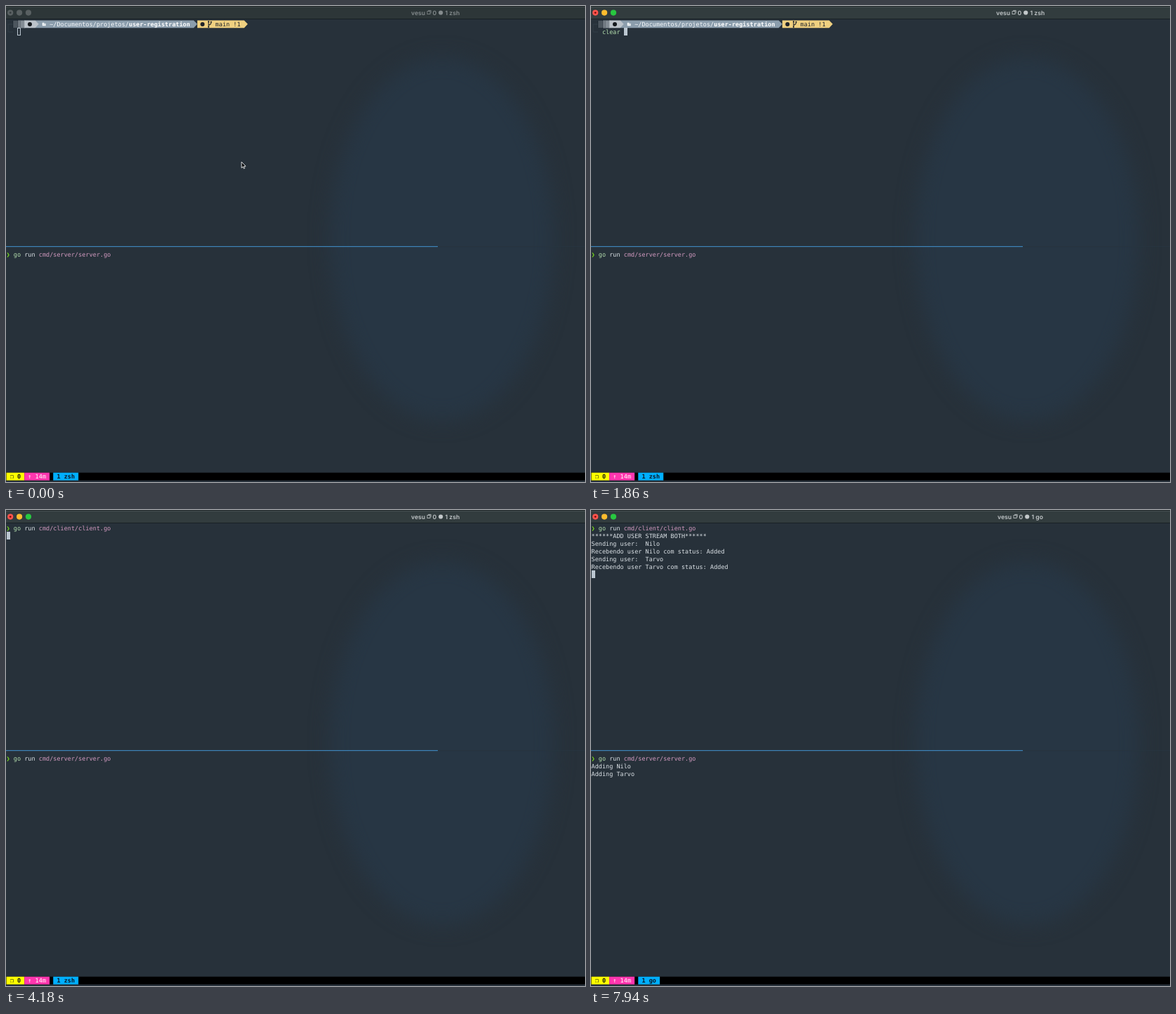
Recreate the animation shown at these times as an HTML page with a canvas. Size 826 by 678 pixels, loop 8 s.

```html
<!DOCTYPE html>
<html lang="pt">
<head>
<meta charset="utf-8">
<title>Terminal</title>
<style>
  html, body { margin: 0; width: 100%; height: 100%; overflow: hidden; background: #27313a; }
  canvas { display: block; width: 826px; height: 678px; }
</style>
</head>
<body>
<canvas id="stage" width="826" height="678"></canvas>
<script>
const LOOP = 8000;
const ctx = document.getElementById('stage').getContext('2d');
ctx.textRendering = 'geometricPrecision';

// Terminal grid
const CELL = 5.14, ROW = 10.92, LEFT = 0.5, TOP = 20.4;
const MONO = '8.54px "DejaVu Sans Mono", monospace';
const UI = '600 8.6px Inter, sans-serif';
const colX = c => LEFT + c * CELL;
const rowY = r => TOP + r * ROW;

const C = {
  bg: '#27313a', text: '#dbe1e6', go: '#b4dfae', path: '#d49bc1', mark: '#7be01c',
  light: '#bcc3ca', blue: '#8b9dac', sand: '#efd080', cursor: '#bcc7d1'
};

// Time points in ms
const FOCUS = 380, FIRST_KEY = 1140, RUN = 4180, REPLY = 5380, REPLY2 = 7380;
const RUN_CLIENT = 'go run cmd/client/client.go';
const HISTORY = [
  [FIRST_KEY, 'clear'], [1400, RUN_CLIENT], [1860, 'clear'],
  [2180, RUN_CLIENT], [3220, 'clear'], [3500, RUN_CLIENT]
];
const USERS = ['Nilo', 'Tarvo'];

function rect(x, y, w, h, color) {
  ctx.fillStyle = color;
  ctx.fillRect(x, y, w, h);
}

function disc(x, y, r, color) {
  ctx.fillStyle = color;
  ctx.beginPath();
  ctx.arc(x, y, r, 0, 7);
  ctx.fill();
}

function poly(points, fill, stroke, width = 1) {
  ctx.beginPath();
  points.forEach(([x, y]) => ctx.lineTo(x, y));
  ctx.closePath();
  if (fill) { ctx.fillStyle = fill; ctx.fill(); }
  if (stroke) { ctx.strokeStyle = stroke; ctx.lineWidth = width; ctx.stroke(); }
}

function print(str, col, row, color = C.text, bold = false) {
  ctx.font = (bold ? 'bold ' : '') + MONO;
  ctx.fillStyle = color;
  ctx.fillText(str, colX(col), rowY(row) + 8.7);
}

function command(str, col, row) {
  const [name, sub, path] = str.split(' ');
  print(name, col, row, C.go);
  if (sub) print(sub, col + 3, row);
  if (path) print(path, col + 7, row, C.path);
}

function entered(str, row) {
  print('❯', 0, row, C.mark, true);
  command(str, 2, row);
}

function cursor(col, row, solid = true) {
  const x = Math.round(colX(col)), y = Math.round(rowY(row));
  if (solid) return rect(x, y, 5, 11, C.cursor);
  ctx.strokeStyle = C.cursor;
  ctx.lineWidth = 1;
  ctx.strokeRect(x + 0.5, y + 0.5, 4, 10);
}

function backdrop() {
  rect(0, 0, 826, 678, C.bg);
  ctx.save();
  ctx.filter = 'blur(14px)';
  ctx.fillStyle = '#273644';
  ctx.beginPath();
  ctx.ellipse(622, 332, 160, 258, 0, 0, 7);
  ctx.fill();
  ctx.restore();
}

function titleBar(active, job) {
  rect(0, 0, 826, 19, active ? '#323c3e' : '#2d3638');
  rect(0, 0, 826, 1, '#1d2426');
  rect(0, 1, 826, 1, active ? '#465052' : '#3c4547');
  rect(0, 18, 826, 1, '#182025');
  const lights = active ? ['#ff544d', '#fdbc2e', '#28c840'] : Array(3).fill('#596062');
  lights.forEach((color, i) => disc(6.2 + i * 12.9, 9.6, 4.1, color));
  disc(6.2, 9.6, 1.4, active ? '#7c0b08' : '#343b3d');

  const color = active ? '#c3c8ca' : '#858c8e';
  const x = job === 'zsh' ? 578 : 580;
  const label = (str, dx) => { ctx.fillStyle = color; ctx.fillText(str, x + dx, 12.5); };
  ctx.font = UI;
  label('vesu', 0);
  label('0', 30.5);
  label('1 ' + job, 48.5);
  ctx.strokeStyle = color;
  ctx.lineWidth = 0.8;
  ctx.strokeRect(x + 23, 7.6, 4, 4);
  ctx.beginPath();
  ctx.moveTo(x + 24.2, 6.4);
  ctx.lineTo(x + 28.2, 6.4);
  ctx.lineTo(x + 28.2, 10.4);
  ctx.stroke();
  disc(x + 42.2, 9.5, 3.1, color);
}

function segment(from, to, color) {
  const y = rowY(0), x1 = colX(to);
  poly([[colX(from), y], [x1, y], [x1 + CELL, y + ROW / 2], [x1, y + ROW], [colX(from), y + ROW]], color);
}

// Dithered fade, thickening over three cells
function fade() {
  const x0 = Math.round(colX(2));
  for (let x = 0; x < 16; x++) {
    for (let y = 0; y < 11; y++) {
      const odd = (x + y) % 2, cell = Math.floor(x / 5.2);
      const on = [odd && y % 2, odd, odd || y % 2][cell];
      if (on) rect(x0 + x, 20.5 + y, 1, 1, C.light);
    }
  }
}

function folderIcon(x, y) {
  rect(x, y, 2.6, 1.4, '#f4f7f9');
  rect(x, y + 1, 5, 3.4, '#f4f7f9');
  rect(x + 1.3, y + 1.9, 3.7, 0.5, C.blue);
}

function branchIcon(x, y) {
  ctx.strokeStyle = '#20242a';
  ctx.lineWidth = 1.1;
  ctx.beginPath();
  ctx.moveTo(x, y);
  ctx.lineTo(x, y + 8);
  ctx.moveTo(x, y + 5.5);
  ctx.quadraticCurveTo(x + 3.6, y + 4.8, x + 3.6, y + 1.5);
  ctx.stroke();
  [[0, 0.5], [0, 8], [3.6, 1]].forEach(([dx, dy]) => disc(x + dx, y + dy, 1.1, '#20242a'));
}

function prompt() {
  ctx.strokeStyle = '#38424b';
  ctx.lineWidth = 0.7;
  ctx.beginPath();
  ctx.moveTo(10, 26);
  ctx.lineTo(3.2, 26);
  ctx.lineTo(3.2, 37);
  ctx.lineTo(10, 37);
  ctx.stroke();

  segment(53, 66, C.sand);
  segment(8, 52, C.blue);
  segment(5, 8, C.light);
  fade();
  disc(34, 26, 3, '#15191d');
  folderIcon(51.8, 23.8);
  print('~/Documentos/projetos/', 12, 0, '#f6f8fa');
  print('user-registration', 34, 0, '#ffffff', true);
  disc(280.3, 26, 3, '#20242a');
  branchIcon(289, 21.8);
  print('main !1', 58, 0, '#20242a');
}

function statusBar(job) {
  const y = 664.7, h = 11;
  const block = (col, cells, color) => rect(colX(col), y, cells * CELL, h, color);
  rect(0, y, 826, h, '#000');
  block(0, 5, '#ffff00');
  block(5, 7, '#ff36ae');
  block(13, job.length + 4, '#00afff');
  print('❐', 1, 59, '#111');
  print('0', 3, 59, '#111', true);
  print('↑ 14m', 6, 59, '#fff');
  print('1 ' + job, 14, 59, '#0b1620', true);
}

function divider() {
  rect(0, 342, 616, 1.2, '#3d83b8');
  rect(616, 342, 210, 1.2, '#27343f');
}

function arrow(x, y) {
  const tip = [[0, 0], [0, 8.6], [2, 6.8], [3.3, 9.7], [4.6, 9.1], [3.4, 6.3], [6, 6.2]];
  poly(tip.map(([px, py]) => [x + px, y + py]), '#0a0c0e', '#f2f4f5', 0.9);
}

function beam(x, y) {
  for (const [color, width] of [['#11171c', 2.4], ['#e9edf0', 1]]) {
    ctx.strokeStyle = color;
    ctx.lineWidth = width;
    ctx.beginPath();
    for (const s of [-1, 1]) {
      ctx.moveTo(x - 2.5, y + s * 5);
      ctx.lineTo(x, y + s * 4);
      ctx.lineTo(x + 2.5, y + s * 5);
    }
    ctx.moveTo(x, y - 4);
    ctx.lineTo(x, y + 4);
    ctx.moveTo(x - 1.5, y);
    ctx.lineTo(x + 1.5, y);
    ctx.stroke();
  }
}

function pointer(t) {
  if (t >= FIRST_KEY) return;
  if (t < FOCUS) arrow(336 - t / FOCUS, 222);
  else beam(335.2, 223);
}

function client(t) {
  if (t < RUN) {
    prompt();
    const entry = HISTORY.filter(([at]) => t >= at).pop();
    if (entry) command(entry[1], 3, 0 + 1);
    cursor(entry ? entry[1].length + 4 : 3, 1, t >= FOCUS);
    return;
  }
  entered(RUN_CLIENT, 0);
  let row = 1;
  if (t >= REPLY) print('******ADD USER STREAM BOTH******', 0, row++);
  for (const user of replied(t)) {
    print('Sending user:  ' + user, 0, row++);
    print(`Recebendo user ${user} com status: Added`, 0, row++);
  }
  cursor(0, row);
}

function server(t) {
  entered('go run cmd/server/server.go', 30);
  replied(t).forEach((user, i) => print('Adding ' + user, 0, 31 + i));
}

function replied(t) {
  return USERS.slice(0, t < REPLY ? 0 : t < REPLY2 ? 1 : 2);
}

function draw(t) {
  const job = t < REPLY ? 'zsh' : 'go';
  backdrop();
  titleBar(t >= FOCUS, job);
  client(t);
  divider();
  server(t);
  statusBar(job);
  pointer(t);
}

const start = performance.now();
function tick() {
  draw((performance.now() - start) % LOOP);
  requestAnimationFrame(tick);
}
tick();
</script>
</body>
</html>
```
